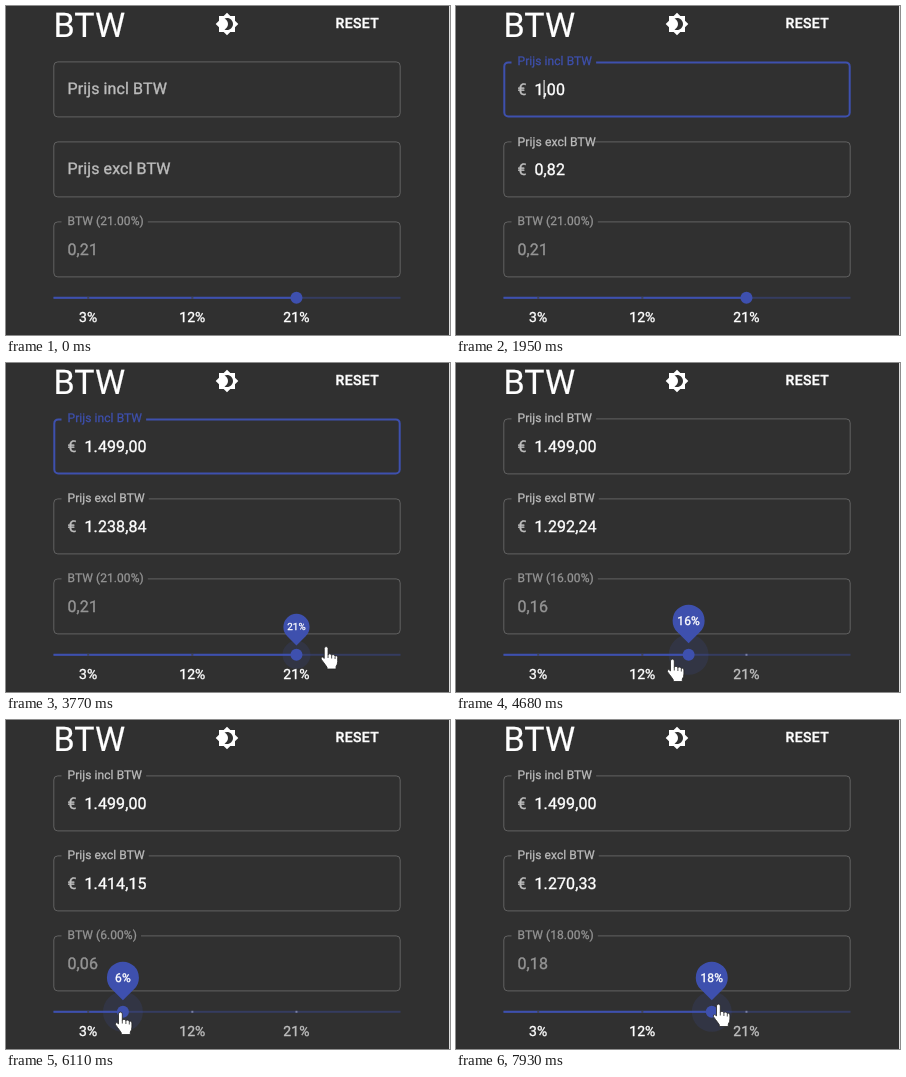
Recreate the animation shown at these times as an HTML page. Size 444 by 329 pixels, loop 8000 ms.

```html
<!DOCTYPE html>
<html lang="nl">
<head>
<meta charset="utf-8">
<title>BTW</title>
<style>
  html, body { margin: 0; width: 100%; height: 100%; overflow: hidden; background: #303030; }
  svg { display: block; width: 444px; height: 329px; }
  text { font: 16px Roboto, "Liberation Sans", sans-serif; fill: #fff; letter-spacing: .1px; stroke: #fff; stroke-width: .35px; text-rendering: geometricPrecision; }
  .dim { fill: #bdbdbd; stroke: #bdbdbd; }
  .off { fill: #959595; stroke: #959595; }
  .hot { fill: #3e50ae; stroke: #3e50ae; }
  .mid { text-anchor: middle; }
</style>
</head>
<body>
<svg id="stage" viewBox="0 0 444 329">
  <text x="47.5" y="31.3" style="font-size:34px;stroke-width:.2px">BTW</text>
  <path transform="translate(209 6)" fill="#fff" d="M20 8.69V4h-4.69L12 .69 8.69 4H4v4.69L.69 12 4 15.31V20h4.69L12 23.31 15.31 20H20v-4.69L23.31 12 20 8.69zM12 18c-.89 0-1.74-.2-2.5-.55C11.56 16.5 13 14.42 13 12s-1.44-4.5-3.5-5.45C10.26 6.2 11.11 6 12 6c3.31 0 6 2.69 6 6s-2.69 6-6 6z"/>
  <text class="mid" x="351.3" y="22.4" style="font-size:14px;font-weight:500;letter-spacing:.35px">RESET</text>
  <rect x="443" width="1" height="329" fill="#ddd"/>
</svg>
<script>
const LOOP = 8000, STEP = 130, BLINK = 520;
const FOCUS = 780, FILL = 1820, PRESS = 4160, HOVER = 3770;
const BLUE = '#3e50ae', RAIL_Y = 291.8;
const stage = document.getElementById('stage');

function add(tag, attrs, parent = stage) {
  const el = document.createElementNS('http://www.w3.org/2000/svg', tag);
  set(el, attrs);
  return parent.appendChild(el);
}
function set(el, attrs) {
  for (const k in attrs) el.setAttribute(k, attrs[k]);
}
const show = (el, on) => el.setAttribute('visibility', on ? 'visible' : 'hidden');
const sliderX = percent => 47.5 + percent * 11.57;

// Linear interpolation between [time, value] points
function track(t, points) {
  const i = points.findIndex(p => p[0] > t);
  if (i < 0) return points[points.length - 1][1];
  if (i === 0) return points[0][1];
  const [t0, a] = points[i - 1], [t1, b] = points[i];
  return a + (b - a) * (t - t0) / (t1 - t0);
}
function easeOut(p) {
  p = Math.min(1, Math.max(0, p));
  return 1 - (1 - p) ** 3;
}
// Amounts are cut off, not rounded, at two decimals
function money(n) {
  const [whole, cents] = (Math.floor(n * 100 + 1e-6) / 100).toFixed(2).split('.');
  return whole.replace(/\B(?=(\d{3})+$)/g, '.') + ',' + cents;
}

function makeField(y) {
  const border = add('rect', { fill: 'none', rx: 4 });
  const notch = add('rect', { x: 55.5, y: y - 2, height: 5, fill: '#303030' });
  const label = add('text', {});
  const euro = add('text', { x: 61.5, y: y + 33.5, class: 'dim' });
  euro.textContent = '€';
  const value = add('text', { x: 78.5, y: y + 33.5 });
  return { y, border, notch, label, euro, value };
}
function drawField(f, name, text, { float = 1, focus = false, off = false }) {
  const w = focus ? 2 : 1;
  set(f.border, {
    x: 47.3 + w / 2, y: f.y + .4 + w / 2, width: 347.4 - w, height: 56 - w,
    stroke: focus ? BLUE : '#626262', 'stroke-width': w
  });
  f.label.textContent = name;
  set(f.label, {
    class: focus ? 'hot' : off ? 'off' : 'dim',
    transform: `translate(61.5 ${f.y + 33.2 - 29 * float}) scale(${1 - float / 4})`
  });
  f.notch.setAttribute('width', float * (f.label.getComputedTextLength() * .75 + 10));
  f.value.textContent = text;
  show(f.euro, text && !off);
  if (off) set(f.value, { x: 61.5, class: 'off' });
}

const incl = makeField(55), excl = makeField(135), rate = makeField(215);
const caret = add('rect', { y: 74, width: 1, height: 19, fill: '#fff' });

add('rect', { x: 47.5, y: RAIL_Y - 1, width: 347, height: 2, fill: BLUE, opacity: .38 });
const bar = add('rect', { x: 47.5, y: RAIL_Y - 1, height: 2, fill: BLUE });
const marks = [3, 12, 21].map(percent => {
  const x = sliderX(percent);
  const dot = add('rect', { x: x - 1, y: RAIL_Y - 1, width: 2, height: 2 });
  const label = add('text', { x, y: 316, class: 'mid', style: 'font-size:14px' });
  label.textContent = percent + '%';
  return { percent, dot, label };
});

const thumb = add('g', {});
const ring = add('circle', { fill: BLUE, opacity: .16 }, thumb);
add('circle', { r: 6, fill: BLUE }, thumb);
const bubble = add('g', {}, thumb);
add('path', { d: 'M0-11.5L-11.3-22.8A16 16 0 1 1 11.3-22.8Z', fill: BLUE }, bubble);
const tip = add('text', { y: -30, class: 'mid', style: 'font-size:12px' }, bubble);

const hand = add('g', { stroke: '#222', 'stroke-width': .8, 'stroke-linejoin': 'round' });
add('path', {
  fill: '#fff',
  d: 'M-2 2a1.9 1.9 0 0 1 3.8 0V8.5q.2-1.2 1.7-1.2 1.6 0 1.9 1.6.5-.8 1.6-.8 1.6 0 1.8 1.7.4-.6 1.2-.6 1.4 0 1.4 1.8V15q0 3-1.6 5v2.5H.8V20.8Q-1 18-3 15.5-6 12-5 11q1.2-1.2 3 .9z'
}, hand);
add('path', { fill: 'none', d: 'M1.8 8.5v3M5.4 9v3M8.8 10v2.5' }, hand);

const typed = [[1950, 1], [2340, 14], [2730, 149], [2860, 1499]];
const percents = [[4420, 21], [4680, 16], [5330, 12], [5720, 12], [6110, 6], [6370, 3], [7410, 3], [7930, 18]];
const handX = [[3640, 330], [PRESS, 291], [4420, 291], [4680, 216.5], [5330, 187], [5720, 187], [6110, 114.5], [6370, 82], [7280, 82], [7410, 156.5], [7930, 262.5]];
const handY = [[3640, 281], [PRESS, 291], [4420, 292], [4680, 296], [5720, 295], [6110, 292], [6370, 288], [7280, 288], [7410, 281], [7930, 284]];

function draw(t) {
  const percent = Math.round(track(t, percents));
  const [keyTime, amount] = typed.filter(k => k[0] <= t).pop() || [910, 0];
  const focus = t > FOCUS && t < PRESS;
  const text = amount ? money(amount) : '';

  drawField(incl, 'Prijs incl BTW', text, { float: easeOut((t - FOCUS) / 200), focus });
  drawField(excl, 'Prijs excl BTW', amount ? money(amount / (1 + percent / 100)) : '',
    { float: easeOut((t - FILL) / 200) });
  drawField(rate, `BTW (${percent}.00%)`, (percent / 100).toFixed(2).replace('.', ','), { off: true });

  const whole = text.indexOf(',');
  caret.setAttribute('x', text ? 78.5 + incl.value.getSubStringLength(0, whole) : 61.5);
  show(caret, focus && Math.floor((t - keyTime) / BLINK) % 2 === 0);

  const x = sliderX(percent);
  bar.setAttribute('width', x - 47.5);
  for (const m of marks) {
    const on = percent >= m.percent;
    set(m.dot, { fill: on ? '#424242' : '#8a90b4', opacity: .8 });
    m.label.setAttribute('class', on ? 'mid' : 'mid dim');
  }
  thumb.setAttribute('transform', `translate(${x} ${RAIL_Y})`);
  ring.setAttribute('r', t < HOVER ? 0 : t < PRESS ? 14 : 20);
  bubble.setAttribute('transform', `scale(${easeOut((t - HOVER + 65) / 150)})`);
  tip.textContent = percent + '%';

  show(hand, t >= 3640);
  hand.setAttribute('transform', `translate(${track(t, handX)} ${track(t, handY)})`);
}

function tick() {
  const t = performance.now() % LOOP;
  draw(Math.floor(t / STEP) * STEP);
  requestAnimationFrame(tick);
}
tick();
</script>
</body>
</html>
```
